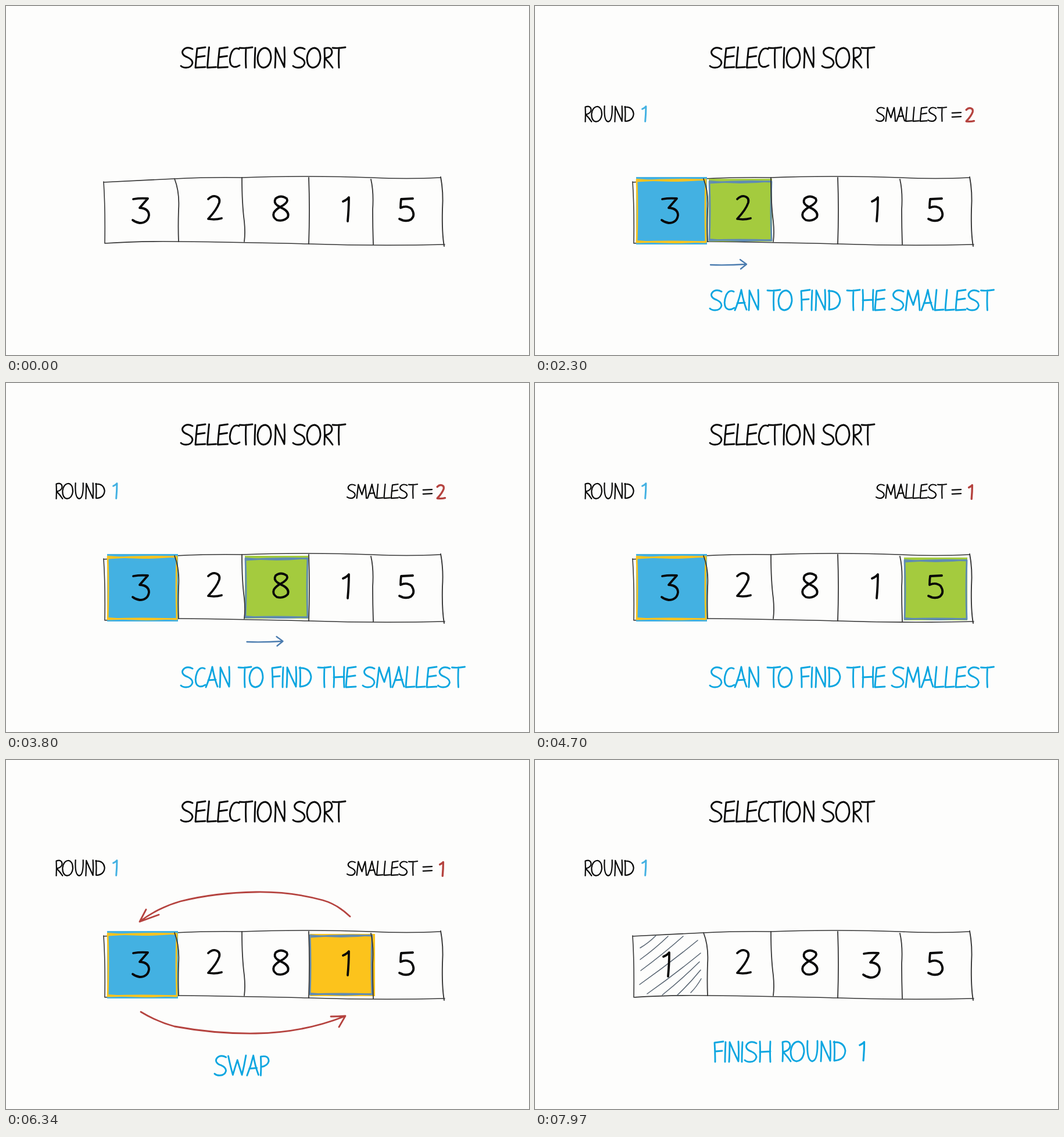
Write an HTML page that moves like this. It is 900x600 px and loops after 8000 ms.

```html
<!DOCTYPE html>
<html lang="en">
<head>
<meta charset="utf-8">
<title>Selection sort</title>
<style>
html, body { margin: 0; width: 100%; height: 100%; overflow: hidden; background: #fdfdfc; }
svg { display: block; width: 100vw; height: 100vh; }
path { fill: none; stroke-linecap: round; stroke-linejoin: round; vector-effect: non-scaling-stroke; }
</style>
</head>
<body>
<svg id="stage" viewBox="0 0 900 600" role="img" aria-label="Selection sort, round 1"></svg>
<script>
const LOOP = 8000;
const INK = '#080808', LINE = '#363636', SKY = '#43b1e2', CYAN = '#0ea6e0';
const RED = '#b5433f', GREEN = '#a4cb3e', YELLOW = '#fcc31c', BLUE = '#5f8bb4';

// Pen strokes of the hand lettering: advance, path (cap height 35)
const LETTERS = {
  A: [23, 'M1 35Q8 18 12 0Q15 18 21 34M5 23L18 22'],
  C: [18, 'M17 3Q9-1 4 9Q-1 22 3 30Q8 37 18 31'],
  D: [22, 'M2 1Q3 18 2 34Q20 33 21 17Q19 1 1 2'],
  E: [20.5, 'M4 2Q2 20 1 35L18 34M4 2L18 0M3 17L17 15'],
  F: [19, 'M3 35Q3 18 2 2L17 0M3 17L15 16'],
  H: [22, 'M2 0Q3 18 2 35M20 0Q19 18 20 35M2 18L20 17'],
  I: [6, 'M2 1Q1 20 1 35'],
  L: [18, 'M4 0Q2 20 1 35L16 34'],
  M: [26, 'M0 35Q2 18 4 1Q8 14 13 26Q17 12 21 1Q23 18 24 35'],
  N: [23, 'M2 35Q3 18 3 1Q10 18 18 34Q19 17 18 0'],
  O: [28, 'M13 1Q2 2 0 18Q0 34 10 35Q21 34 23 19Q23 3 13 1'],
  P: [18, 'M2 35Q3 18 2 2Q16-1 16 10Q14 18 3 20'],
  R: [16, 'M2 35Q3 18 2 2Q14-2 15 8Q15 16 3 19Q10 26 16 35'],
  S: [24, 'M20 3Q13-1 7 2Q1 6 3 11Q5 15 11 17Q20 21 20 27Q18 35 9 35Q3 35 0 32'],
  T: [25, 'M0 1Q10 2 22 0M11 1Q10 20 11 35'],
  U: [22, 'M1 0Q-1 33 9 35Q19 34 18 0'],
  W: [32, 'M0 1Q4 20 8 34Q12 20 16 8Q20 22 24 34Q28 18 31 0'],
  '=': [24, 'M1 14L23 13M1 24L23 23'],
  1: [14, 'M1 8Q8 5 11 1Q11 20 9 42'],
  2: [28, 'M2 6Q8 0 14 1Q23 3 21 12Q17 24 2 40Q14 42 25 39'],
  3: [30, 'M2 2Q14 0 27 1L13 17Q29 18 29 30Q27 43 13 43Q6 42 1 38'],
  5: [30, 'M24 2L4 3Q3 10 3 18Q14 13 22 20Q29 31 21 38Q12 43 1 37'],
  8: [30, 'M25 5Q15-2 6 5Q2 12 9 17Q14 20 20 23Q30 29 27 37Q20 45 8 42Q0 37 3 29Q7 23 15 19Q26 13 26 8L25 5']
};

const stage = document.getElementById('stage');
const parts = [];

function add(parent, tag, attrs) {
  const el = document.createElementNS('http://www.w3.org/2000/svg', tag);
  for (const k in attrs) el.setAttribute(k, attrs[k]);
  return parent.appendChild(el);
}

// A layer visible from one time up to another
function layer(from = 0, to = LOOP) {
  const el = add(stage, 'g', {});
  parts.push({ el, from, to });
  return el;
}

function pen(g, d, stroke, width) {
  return add(g, 'path', { d, stroke, 'stroke-width': width });
}

function write(g, word, x, y, size, color, width) {
  const box = add(g, 'g', { 'aria-label': word, transform: `translate(${x} ${y}) scale(${size})` });
  let dx = 0;
  for (const ch of word) {
    const [step, d] = LETTERS[ch];
    pen(box, d, color, width).setAttribute('transform', `translate(${dx} 0)`);
    dx += step;
  }
}

function fill(g, x, y, w, h, color) {
  add(g, 'rect', { x, y, width: w, height: h, fill: color });
}

// Sketchy frame, gone round twice with small offsets
function frame(g, x, y, w, h, color) {
  const r = x + w, b = y + h, mx = x + w / 2, my = y + h / 2;
  pen(g, `M${x} ${y + 2}Q${mx} ${y - 2} ${r} ${y}Q${r - 2} ${my} ${r} ${b}Q${mx} ${b - 2} ${x} ${b}Q${x + 2} ${my} ${x} ${y}`, color, 2.8);
  pen(g, `M${x} ${y - 1}Q${mx} ${y + 5} ${r} ${y - 1}M${x} ${b - 2}Q${mx} ${b + 3} ${r - 1} ${b - 1}`, color, 2.2);
}

// One step of the story per beat
const BEAT = 767;
const beat = n => 740 + n * BEAT;
const T = {
  round: beat(0), start: beat(1), two: beat(2), eight: beat(3), one: beat(4),
  five: beat(5), found: beat(6) - 2, swap: beat(7), done: beat(8), end: beat(9)
};

// Outer box
const outer = layer();
pen(outer, 'M168 303Q230 300 290 297Q350 294 405 295Q460 293 520 293Q575 293 628 295Q690 298 748 295', LINE, 1.6);
pen(outer, 'M748 294Q753 320 751 350Q750 390 754 413', LINE, 1.9);
pen(outer, 'M170 408Q230 404 297 405Q400 406 520 409Q640 413 755 410M168 302Q171 350 170 408', LINE, 1.6);

// Highlights
const current = layer(T.start, T.end);
fill(current, 174, 294, 122, 116, SKY);
frame(current, 175, 299, 119, 107, YELLOW);

function scan(from, to, x, y, color) {
  const g = layer(from, to);
  fill(g, x, y, 109, 108, color);
  frame(g, x + 1, y + 5, 107, 101, BLUE);
}
scan(T.two, T.eight, 299, 297, GREEN);
scan(T.eight, T.one, 411, 297, GREEN);
scan(T.one, T.five, 523, 298, GREEN);
scan(T.five, T.found, 635, 300, GREEN);

const found = layer(T.found, T.end);
fill(found, 523, 299, 112, 107, YELLOW);
frame(found, 523, 302, 107, 101, BLUE);

// Dividers
pen(layer(), 'M290 297Q299 320 297 350Q296 380 297 405M406 295Q406 340 410 370Q412 390 410 405M521 295Q523 350 521 409M628 298Q633 320 631 350Q631 380 632 410', LINE, 1.8);

// Hatching of the finished cell
const hatch = layer(T.end);
for (const [x1, y1, x2, y2] of [
  [181, 323, 208, 302], [181, 343, 229, 303], [182, 362, 255, 303], [180, 386, 280, 310],
  [193, 402, 285, 332], [219, 404, 283, 347], [245, 404, 285, 361], [268, 400, 286, 376]
]) pen(hatch, `M${x1} ${y1}Q${(x1 + x2) / 2 + 1} ${(y1 + y2) / 2 + 2} ${x2} ${y2}`, '#566370', 1.5);

// Numbers in the cells
const digit = (g, n, x, y) => write(g, n, x, y, 1, INK, 3.8);
const fixed = layer(), before = layer(0, T.done), after = layer(T.done);
digit(fixed, '2', 346, 326);
digit(fixed, '8', 458, 326);
digit(fixed, '5', 676, 329);
digit(before, '3', 217, 330);
digit(before, '1', 579, 328);
digit(after, '1', 220, 330);
digit(after, '3', 564, 331);

// Headings
const title = layer();
write(title, 'SELECTION', 301, 71, 1, INK, 2.9);
write(title, 'SORT', 494, 71, 1, INK, 2.9);

const round = layer(T.round);
write(round, 'ROUND', 85, 172, .77, INK, 2.2);
write(round, '1', 184, 172, .63, SKY, 3);

const label = layer(T.start, T.end);
write(label, 'SMALLEST', 587, 174, .69, INK, 2.2);
write(label, '=', 717, 174, .7, INK, 2.2);

const smallest = (n, x, from, to) => write(layer(from, to), n, x, 175, .58, RED, 3.4);
smallest('3', 741, T.start, T.two);
smallest('2', 741, T.two, T.one);
smallest('1', 746, T.one, T.end);

// Captions
const caption = layer(T.two, T.found);
for (const [word, x] of [['SCAN', 301], ['T', 400], ['O', 419], ['FIND', 456], ['THE', 537], ['SMALLEST', 614]])
  write(caption, word, x, 488, 1, CYAN, 2.9);

write(layer(T.swap, T.done), 'SWAP', 359, 508, .98, CYAN, 2.9);

const finish = layer(T.end);
write(finish, 'FINISH', 307, 484, 1, CYAN, 2.9);
write(finish, 'ROUND', 424, 483, 1, CYAN, 2.9);
write(finish, '1', 558, 484, .78, CYAN, 3.2);

// Scan arrow under the tested cell
[T.two, T.eight, T.one].forEach((from, i) => {
  const g = layer(from, from + BEAT);
  g.setAttribute('transform', `translate(${i * 112.5} 0)`);
  pen(g, 'M302 445Q330 446 363 444M353 436L364 444L354 452', '#4b7caf', 2.3);
});

// Swap arrows
const arrows = layer(T.swap, T.done);
pen(arrows, 'M592 269Q570 248 545 241Q490 226 430 227Q360 228 300 243Q262 254 231 277M241 257L230 278L263 266', RED, 2.8);
pen(arrows, 'M232 433Q260 450 290 458Q360 471 430 470Q510 469 582 441M559 441Q572 441 584 440L573 459', RED, 2.8);

function draw(t) {
  for (const { el, from, to } of parts)
    el.style.display = t >= from && t < to ? '' : 'none';
}

const begin = performance.now();
function tick() {
  draw((performance.now() - begin) % LOOP);
  requestAnimationFrame(tick);
}
tick();
</script>
</body>
</html>
```
